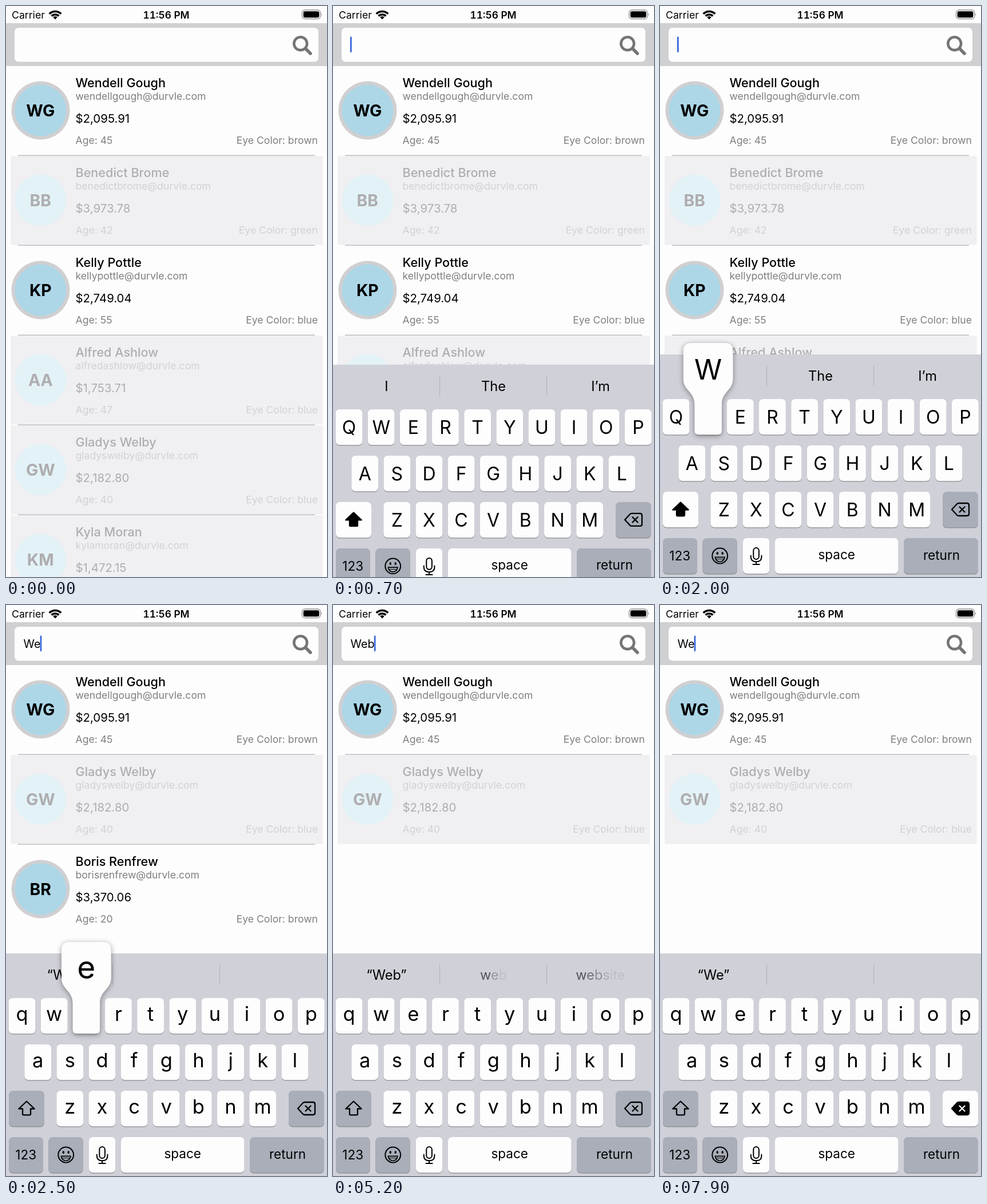
An HTML page that plays this animation: 561 by 998 pixels, repeating every 8000 ms.

```html
<!DOCTYPE html>
<html lang="en">
<head>
<meta charset="utf-8">
<title>Contact search</title>
<style>
html, body { margin: 0; width: 100%; height: 100%; overflow: hidden; background: #fefdfe; }
svg { display: block; width: 561px; height: 998px; font-family: Inter, Roboto, "Liberation Sans", sans-serif; }
text { white-space: pre; }
.mid { text-anchor: middle; }
.end { text-anchor: end; }
.name { font-size: 21.6px; font-weight: 500; }
.small { font-size: 17.6px; fill: #7f7e80; }
.price { font-size: 20.4px; }
.initials { font-size: 28.4px; font-weight: 700; }
.off text { fill: #aeadaf; }
.off .small { fill: #d2d1d4; }
.upper { font-size: 32px; }
.lower { font-size: 34.5px; }
.label { font-size: 22.5px; }
.hint { font-size: 23.6px; }
.line { fill: none; stroke: #000; stroke-width: 2.3; stroke-linecap: round; stroke-linejoin: round; }
.pop { filter: drop-shadow(0 2px 5px rgba(0, 0, 0, .4)); }
</style>
</head>
<body>
<svg viewBox="0 0 561 998">
  <rect width="561" height="998" fill="#fefdfe"/>
  <g id="list"></g>

  <text x="10" y="21.5" font-size="17.7">Carrier</text>
  <g class="line" style="stroke-width:3.5;stroke-linecap:butt">
    <path d="M75.7 13.8A14.4 14.4 0 0 1 96.3 13.8M79.6 17.6A9 9 0 0 1 92.4 17.6"/>
  </g>
  <path d="M86 23.4L82.2 19.5A5.4 5.4 0 0 1 89.8 19.5Z"/>
  <text class="mid" x="280" y="21.5" font-size="17.3" font-weight="600" style="font-feature-settings:'tnum'">11:56 PM</text>
  <rect x="517.5" y="7" width="32" height="15.5" rx="5" fill="none" stroke="#969597" stroke-width="1.4"/>
  <rect x="519.7" y="9.2" width="27.6" height="11.1" rx="3"/>
  <path d="M551 12.3Q553.2 14.7 551 17.2Z" fill="#969597"/>

  <rect y="30" width="561" height="75" fill="#d0cfd1"/>
  <rect x="15" y="38" width="531" height="59.5" rx="7" fill="#fefdfe"/>
  <g fill="none" stroke="#757475">
    <circle cx="514.7" cy="65.7" r="11.4" stroke-width="4.6"/>
    <path d="M523.8 74.8L532 83" stroke-width="5.6" stroke-linecap="round"/>
  </g>
  <text id="query" x="30.5" y="75" font-size="19.7"></text>
  <rect id="caret" y="53.5" width="2.7" height="27.5" rx="1.2" fill="#3366dc"/>

  <g id="board">
    <rect y="609" width="561" height="420" fill="#d0d1d8"/>
    <path d="M186.5 628V664M373.5 628V664" stroke="#b6b7bd" stroke-width="1.3"/>
    <g id="hints"></g>
    <g id="upper"></g>
    <g id="lower"></g>
    <g id="fixed"></g>
    <g id="shift"></g>
    <g id="del"></g>
    <g id="pop"></g>
  </g>
</svg>
<script>
const $ = id => document.getElementById(id);
const clamp = v => Math.min(1, Math.max(0, v));
const LOOP = 8000;

const people = {
  WG: ['Wendell Gough', '$2,095.91', 45, 'brown', 1],
  BB: ['Benedict Brome', '$3,973.78', 42, 'green', 0],
  KP: ['Kelly Pottle', '$2,749.04', 55, 'blue', 1],
  AA: ['Alfred Ashlow', '$1,753.71', 47, 'blue', 0],
  GW: ['Gladys Welby', '$2,182.80', 40, 'blue', 0],
  KM: ['Kyla Moran', '$1,472.15', 30, 'blue', 0],
  BR: ['Boris Renfrew', '$3,370.06', 20, 'brown', 1]
};

// Each track is a list of [start, value]
const queries = [[0, ''], [2050, 'W'], [2350, 'We'], [4850, 'Web'], [5950, 'Webs'], [7350, 'Web'], [7850, 'We']];
const lists = [[0, 'WG BB KP AA GW KM'], [2450, 'WG GW BR'], [4950, 'WG GW'], [6050, 'WG'], [7450, 'WG GW']];
const hintTrack = [
  [0, ['I', 'The', 'I’m'], -1000],
  [2150, ['“W”', '', ''], 0],
  [2550, ['“We”', 'We’re', 'Well'], 2780],
  [5050, ['“Web”', 'web', 'website'], 5080],
  [5950, ['“Webs”', 'website', 'we should'], 6000],
  [7450, ['“Web”', 'web', 'website'], 7500],
  [7850, ['“We”', '', ''], 7850]
];
const popTrack = [[0, ''], [1950, 'W'], [2150, ''], [2250, 'e'], [2550, ''], [4750, 'b'], [4950, ''], [5850, 's'], [6050, '']];
const delTrack = [[0, false], [7350, true], [7550, false], [7750, true]];
const caretX = [30, 48.5, 59.6, 71.8, 82.4];
// [time, opacity], joined by straight ramps
const blink = [
  [499, 0], [500, 1], [960, 1], [1200, 0], [1350, 0], [1500, 1],
  [3440, 1], [3590, 0], [4050, 0], [4170, 1], [4440, 1], [4590, 0], [4799, 0], [4800, 1],
  [6500, 1], [6625, 0], [6850, 0], [7000, 1], [8000, 1]
];

const at = (track, t) => track.filter(s => s[0] <= t).pop();

function ramp(points, t) {
  const i = points.findIndex(p => p[0] > t);
  if (i <= 0) return points[i ? points.length - 1 : 0][1];
  const [a, u] = points[i - 1], [b, v] = points[i];
  return u + (v - u) * (t - a) / (b - a);
}

const text = (cls, x, y, s) => `<text class="${cls}" x="${x}" y="${y}">${s}</text>`;

function row(id, i, last) {
  const [name, price, age, eyes, on] = people[id];
  const mail = name.toLowerCase().replace(' ', '') + '@durvle.com';
  return `<g transform="translate(0 ${105 + 157 * i})" class="${on ? '' : 'off'}">
    ${on ? '<circle cx="60.5" cy="77.5" r="51" fill="#d0cfd1"/>'
         : '<rect x="8" y="0.3" width="545.5" height="155.2" fill="#f0eff2"/>'}
    <circle cx="60.5" cy="77.5" r="45" fill="${on ? '#add7e7' : '#e3f2f7'}"/>
    ${text('initials mid', 60.3, 88, id)}
    ${text('name', 121.5, 36.5, name)}
    ${text('small', 121.5, 59, mail)}
    ${text('price', 121.5, 99, price)}
    ${text('small', 121.5, 136, 'Age: ' + age)}
    ${text('small end', 545, 136, 'Eye Color: ' + eyes)}
    ${last ? '' : '<path d="M21 156.3H540" stroke="#bdbcbe" stroke-width="1.5"/>'}
  </g>`;
}

const key = (x, y, w, fill = '#fefdfe') =>
  `<rect x="${x}" y="${y + 1.6}" width="${w}" height="62" rx="7" fill="#898b90"/>
   <rect x="${x}" y="${y}" width="${w}" height="62.3" rx="7" fill="${fill}"/>`;
const GRAY = '#a9aeb9';

// Letter positions: centre x and key top
const spots = {};
[['qwertyuiop', 28, 687], ['asdfghjkl', 55.7, 768], ['zxcvbnm', 111.7, 849]].forEach(([chars, x, y]) =>
  [...chars].forEach((c, i) => spots[c] = [x + 56.15 * i, y]));

function letters(upper) {
  return Object.entries(spots).map(([c, [x, y]]) => key(x - 23.4, y, 46.8) +
    (upper ? text('upper mid', x, y + 43, c.toUpperCase()) : text('lower mid', x, y + 40, c))).join('');
}

function popup(c) {
  if (!c) return '';
  const [x, y] = spots[c.toLowerCase()];
  return `<path class="pop" fill="#fefdfe" d="M${x - 43.3} ${y - 84}q0 -14 14 -14h58.6q14 0 14 14v49
    c0 20 -19.6 22 -19.6 44v46.3q0 7 -7 7h-33.4q-7 0 -7 -7v-46.3c0 -22 -19.6 -24 -19.6 -44z"/>` +
    `<text class="mid" x="${x}" y="${y - 34.5}" font-size="${c < 'a' ? 49 : 55}">${c}</text>`;
}

const shiftKey = on => key(5, 849, 62, on ? '#fefdfe' : GRAY) +
  `<path class="line" style="fill:${on ? '#000' : 'none'}" d="M36 867.5L22.3 880.5H29V889.5Q29 891.3 30.8 891.3H41.2Q43 891.3 43 889.5V880.5H49.7Z"/>`;

const delKey = on => key(494, 849, 62, on ? '#fefdfe' : GRAY) +
  `<path class="line" style="fill:${on ? '#000' : 'none'}" d="M510 880L519 870.3Q520.3 869 522 869H536.5Q540 869 540 872.5V887.5Q540 891 536.5 891H522Q520.3 891 519 889.7Z"/>
   <path class="line" style="stroke:${on ? '#fff' : '#000'}" d="M523.5 875.5L532.5 884.5M532.5 875.5L523.5 884.5"/>`;

$('upper').innerHTML = letters(true);
$('lower').innerHTML = letters(false);
$('fixed').innerHTML =
  key(5, 930, 60, GRAY) + text('label mid', 34.7, 969, '123') +
  key(74.3, 930, 60.5, GRAY) +
  `<g class="line" style="stroke-width:2"><circle cx="104.7" cy="961" r="13.4"/>
     <path d="M96.3 963.3H113.1Q111.8 971 104.7 971T96.3 963.3Z" style="stroke-width:1.7"/>
     <path d="M98.5 966.6H111" style="stroke-width:1"/></g>
   <ellipse cx="100.3" cy="956.5" rx="1.7" ry="2.5"/><ellipse cx="109.2" cy="956.5" rx="1.7" ry="2.5"/>` +
  key(145, 930, 46.3) +
  `<g class="line" style="stroke-width:2"><rect x="163.3" y="947" width="9.6" height="20" rx="4.8"/>
     <path d="M158.8 960.5V963Q158.8 971.3 168.1 971.3T177.4 963V960.5M168.1 971.5V976M162.5 976H173.7"/></g>` +
  key(201, 930, 215.5) + text('label mid', 308.7, 967, 'space') +
  key(426, 930, 130, GRAY) + text('label mid', 492, 967.5, 'return');

// A suggestion shown letter by letter as a soft wipe
function hint(word, i, p) {
  const body = [...word].map((c, k) => {
    const o = Math.max(.08, clamp(2 * p - k / word.length));
    return `<tspan fill-opacity="${o.toFixed(3)}">${c}</tspan>`;
  }).join('');
  return text('hint mid', 93.5 + 187 * i, 655, p < 1 && i ? body : word);
}

const cache = {};
function put(id, html) {
  if (cache[id] !== html) $(id).innerHTML = cache[id] = html;
}

function draw(t) {
  const query = at(queries, t)[1];
  $('query').textContent = query;
  $('caret').setAttribute('x', caretX[query.length]);
  $('caret').setAttribute('opacity', ramp(blink, t));

  const ids = at(lists, t)[1].split(' ');
  put('list', ids.map((id, i) => row(id, i, i === ids.length - 1)).join(''));

  const s = Math.max(0, t - 450) * .0194;
  const drop = 391 * (1 + s) * Math.exp(-s);
  $('board').setAttribute('transform', `translate(0 ${drop < .4 ? 0 : drop.toFixed(2)})`);

  const [, words, start] = at(hintTrack, t);
  const p = clamp((t - start) / 400);
  put('hints', words.map((w, i) => t < start && i ? '' : hint(w, i, p)).join(''));

  const caps = t < 2150;
  $('upper').style.display = caps ? '' : 'none';
  $('lower').style.display = caps ? 'none' : '';
  put('shift', shiftKey(caps));
  put('del', delKey(at(delTrack, t)[1]));
  put('pop', popup(at(popTrack, t)[1]));
}

let origin;
function tick(now) {
  origin ??= now;
  draw(Math.max(0, now - origin) % LOOP);
  requestAnimationFrame(tick);
}
draw(0);
requestAnimationFrame(tick);
</script>
</body>
</html>
```
